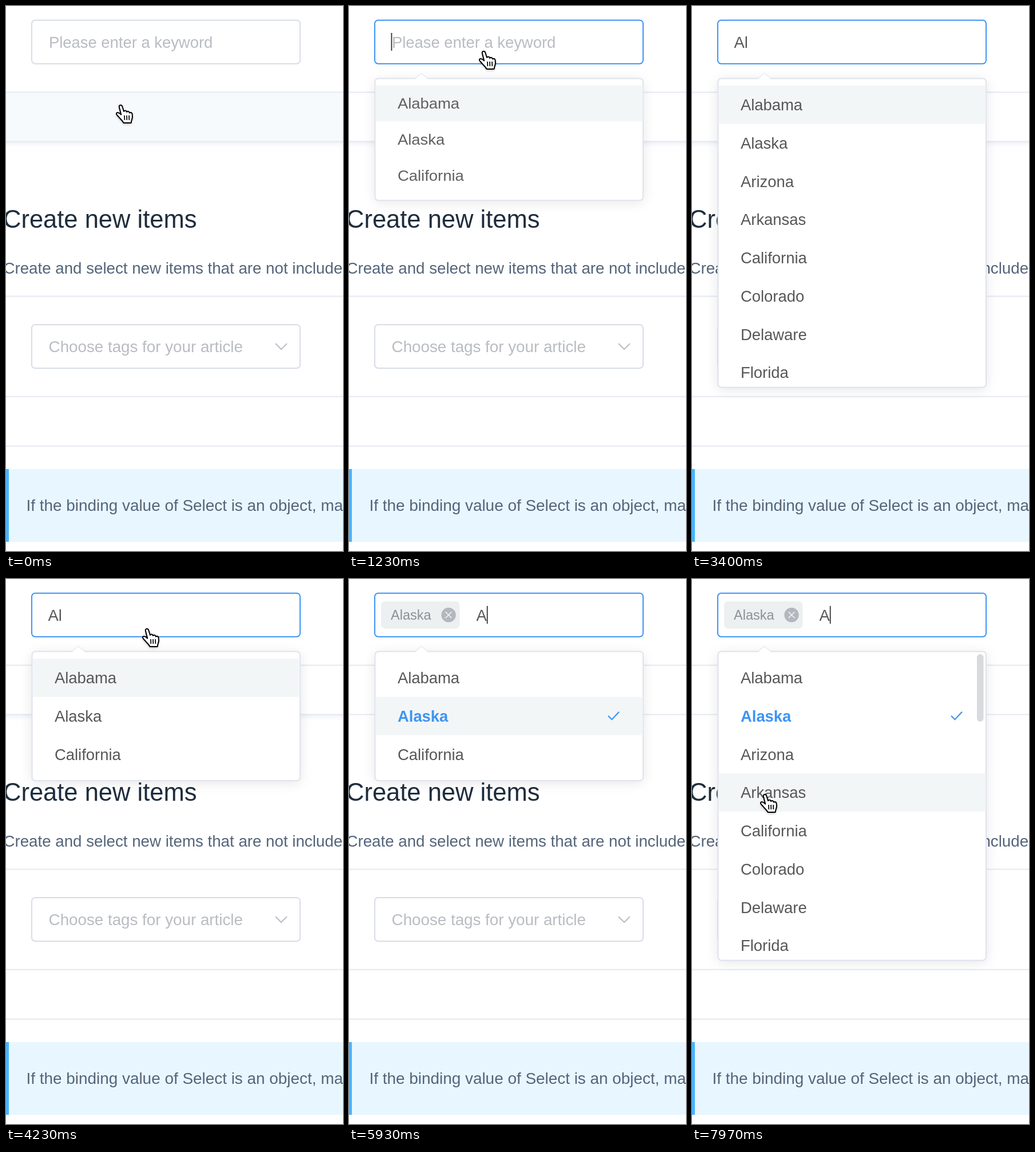
Write an HTML page with a canvas that moves like this. It is 589 px wide and 951 px high and loops after 8 s.

```html
<!DOCTYPE html>
<html lang="en">
<head>
<meta charset="utf-8">
<title>Remote search select</title>
<style>
  html, body { margin: 0; width: 100%; height: 100%; overflow: hidden; background: #fff; }
  canvas { display: block; }
</style>
</head>
<body>
<canvas id="stage" width="589" height="951"></canvas>
<script>
const g = document.getElementById('stage').getContext('2d');
const LOOP = 8000, SIZE = 27.4, ROW = 66.7, LIST_TOP = 139, PANEL_TOP = 126;
const BLUE = '#3d94f4', RULE = '#e6e9f1', BORDER = '#d8dce6', HINT = '#b9bcc2', INK = '#575757', BODY = '#54647a';
const SHORT = ['Alabama', 'Alaska', 'California'];
const LONG = ['Alabama', 'Alaska', 'Arizona', 'Arkansas', 'California', 'Colorado', 'Delaware', 'Florida'];

const CARET_ON = [[1100, 1600], [2100, 2965], [3405, 3925], [4330, 4825], [4965, 5425],
  [5795, 6425], [6950, 7425], [7925, 8000]];
const LOADING = [[2765, 2965], [3725, 3925], [6130, 6330]];
const HIDDEN = [[2425, 4210], [5795, 6180]];
// start, end, x, y
const MOVES = [[30, 530, 227, 78], [4210, 4225, 238, 86], [4230, 4630, 261, 226], [6180, 6925, 119, 362],
  [6960, 7200, 119, 379], [7360, 7430, 119, 377], [7925, 7970, 119, 375]];

const ramp = (t, a, b) => Math.min(1, Math.max(0, (t - a) / (b - a)));
const during = (t, spans) => spans.some(([a, b]) => t >= a && t < b);
const smooth = p => p * p * (3 - 2 * p);

function pointer(t) {
  let x = 192, y = 172;
  for (const [a, b, tx, ty] of MOVES) {
    const p = smooth(ramp(t, a, b));
    x += (tx - x) * p;
    y += (ty - y) * p;
  }
  return { x, y };
}

function text(str, x, y, color, size = SIZE, weight = 400, align = 'left') {
  g.font = `${weight} ${size}px "Liberation Sans", Arial, sans-serif`;
  g.fillStyle = color;
  g.textAlign = align;
  g.fillText(str, x, y);
}

function rect(x, y, w, h, color) {
  g.fillStyle = color;
  g.fillRect(x, y, w, h);
}

function box(x, y, w, h, r, fill, stroke) {
  g.beginPath();
  g.roundRect(x, y, w, h, r);
  if (fill) { g.fillStyle = fill; g.fill(); }
  if (stroke) { g.strokeStyle = stroke; g.lineWidth = 2; g.stroke(); }
}

function line(points, color, width) {
  g.beginPath();
  points.forEach(([x, y]) => g.lineTo(x, y));
  g.strokeStyle = color;
  g.lineWidth = width;
  g.stroke();
}

function shadow(color, blur, dy) {
  g.shadowColor = color;
  g.shadowBlur = blur;
  g.shadowOffsetY = dy;
}

function page(t) {
  rect(0, 0, 589, 951, '#fff');
  const glow = 1 - ramp(t, 4350, 4550);
  g.save();
  shadow(`rgba(215,224,238,${0.55 * glow})`, 9, 3);
  rect(-20, -20, 640, 257, '#fff');
  g.restore();
  g.globalAlpha = 1 - ramp(t, 230, 430);
  rect(0, 151, 589, 85, '#f6fafd');
  g.globalAlpha = 1;
  for (const y of [149.5, 235.5, 505.5, 680.5, 767]) rect(0, y, 589, 2, RULE);

  text('Create new items', -5, 386.5, '#1f2d3d', 43.5);
  text('Create and select new items that are not included in options', -4.5, 466.5, BODY, 27.7);
  box(45, 556, 469, 76, 6, '#fff', BORDER);
  text('Choose tags for your article', 74.6, 604, HINT, 27.75);
  line([[471, 589], [481, 599], [491, 589]], '#b9bdc6', 2);
  rect(0, 808, 589, 127, '#e8f6ff');
  rect(0, 808, 5, 127, '#4ab3ff');
  text('If the binding value of Select is an object, make', 35.5, 880.5, BODY, 27.9);
}

function field(t, chosen) {
  const border = t >= 1100 ? BLUE : ramp(t, 380, 480) === 1 ? '#b6bdcb' : BORDER;
  box(45, 24.7, 469, 76, 6, '#fff', border);
  if (t < 2565) text('Please enter a keyword', 75, 72.5, HINT);

  if (chosen) {
    box(56, 39, 137.5, 47.5, 7, '#ecf0f1');
    text('Alaska', 73, 71, '#8d9095', 23.5);
    g.beginPath();
    g.arc(174, 62.7, 12.7, 0, 7);
    g.fillStyle = '#b3b7be';
    g.fill();
    line([[168.5, 57.2], [179.5, 68.2]], '#f4f6f7', 1.6);
    line([[179.5, 57.2], [168.5, 68.2]], '#f4f6f7', 1.6);
  }

  const typed = t < 2425 ? '' : t < 3395 ? 'A' : t < 5795 ? 'Al' : 'A';
  const x = chosen ? 222.5 : 73.5;
  text(typed, x, 72.5, INK);
  if (during(t, CARET_ON)) rect(x + g.measureText(typed).width, 47, 1.8, 31, '#333');
}

function panel(t, chosen, hand) {
  if (t < 1100) return;
  const open = 1 - (1 - ramp(t, 1100, 1400)) ** 5;
  const loading = during(t, LOADING);
  const long = during(t, [[2965, 3725], [6330, LOOP]]);
  const height = loading ? 73 : long ? 539 : 225.5;
  const hover = Math.max(0, Math.floor((hand.y + 2 - LIST_TOP) / ROW));

  g.save();
  g.globalAlpha = open;
  g.translate(0, PANEL_TOP);
  g.scale(1, open);
  g.translate(0, -PANEL_TOP);

  g.save();
  shadow('rgba(0,0,0,.1)', 22, 4);
  box(45, PANEL_TOP, 469.5, height, 6, '#fff');
  g.restore();
  box(45.5, PANEL_TOP + 0.5, 468.5, height, 6, '#fff', '#dfe2ee');
  g.beginPath();
  g.moveTo(115, 128);
  g.lineTo(126.5, 117.5);
  g.lineTo(138, 128);
  g.fillStyle = '#fff';
  g.fill();
  line([[116, 126], [126.5, 117], [137, 126]], '#e6e9f1', 1.3);

  g.beginPath();
  g.rect(46.5, 118, 467, height + 7);
  g.clip();
  if (loading) {
    text('Loading', 280, 172, '#999', SIZE, 400, 'center');
  } else {
    (long ? LONG : SHORT).forEach((name, i) => {
      const y = LIST_TOP + i * ROW, picked = chosen && name === 'Alaska';
      if (i === hover) rect(46, y, 468, ROW, '#f2f6f7');
      text(name, 85, y + 43.3, picked ? BLUE : INK, SIZE, picked ? 700 : 400);
      if (picked) line([[453, y + 33], [459.5, y + 39.5], [472, y + 26]], BLUE, 2.3);
    });
    if (long && t >= 6330) box(498, 131, 11.5, 118, 6, '#d9dadc');
  }
  g.restore();
}

const HAND = new Path2D(`M6 5C4.5 .5 10 -.5 11.3 3.5L14 12C15 9.5 18.4 10 19 13
  C20.3 11 23.4 11.6 24 14.6C25.4 13 28.2 13.8 28.6 16.6L29 21C29 25.5 27 27 26.6 32
  L13.5 32C12.5 29 8 25.5 5 21.5C2.5 18.5 -.3 16.8 1.2 14.8C2.8 12.8 6.3 14.8 9.2 17.5Z`);

function drawHand({ x, y }) {
  g.save();
  g.translate(x, y);
  g.lineJoin = 'round';
  g.save();
  shadow('rgba(0,0,0,.3)', 4, 2);
  g.fillStyle = '#fff';
  g.fill(HAND);
  g.restore();
  g.strokeStyle = '#000';
  g.lineWidth = 2;
  g.stroke(HAND);
  for (const lx of [15, 19, 23]) line([[lx, 19], [lx + 0.3, 27]], '#000', 1.7);
  g.restore();
}

function draw(t) {
  const chosen = t >= 4965, hand = pointer(t);
  page(t);
  field(t, chosen);
  panel(t, chosen, hand);
  if (!during(t, HIDDEN)) drawHand(hand);
}

const start = performance.now();
function tick() {
  draw((performance.now() - start) % LOOP);
  requestAnimationFrame(tick);
}
tick();
</script>
</body>
</html>
```
